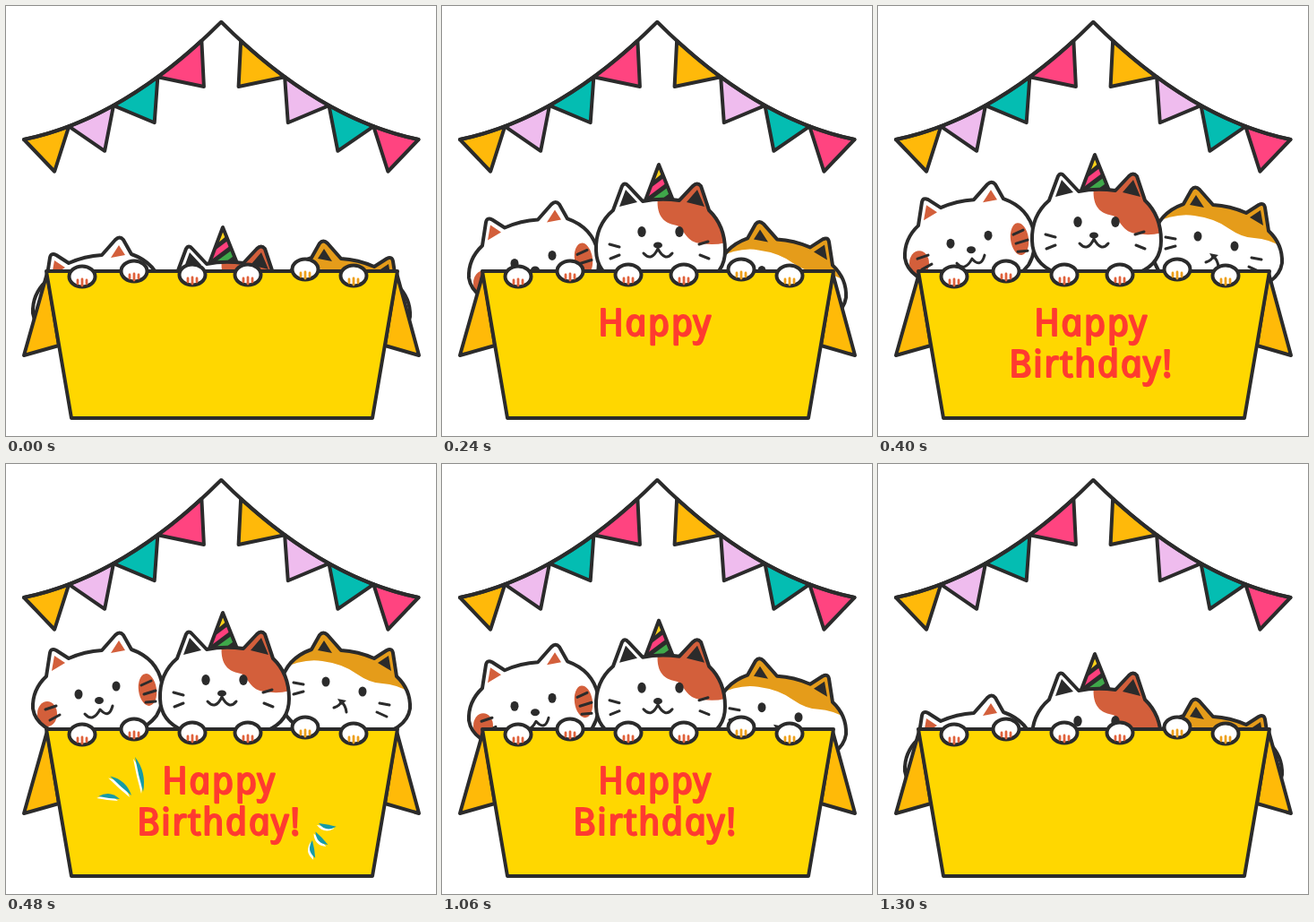
These frames come from a looping animation (480 by 480 pixels, 1380 ms). An HTML page:

```html
<!DOCTYPE html>
<html lang="en">
<head>
<meta charset="utf-8">
<title>Birthday cats</title>
<style>
  html, body { margin: 0; width: 100%; height: 100%; overflow: hidden; background: #fff; }
  svg { display: block; width: 100vw; height: 100vh; }
  .line { stroke: #2b2b2b; stroke-width: 4; stroke-linejoin: round; stroke-linecap: round; }
  .thin { fill: none; stroke: #2b2b2b; stroke-width: 3; stroke-linejoin: round; stroke-linecap: round; }
  .open { fill: none; }
  .white { fill: #fff; }
  .ink { fill: #2b2b2b; }
  .rust { fill: #d35f3b; }
  .amber { fill: #e59c1a; }
  .flap { fill: #ffba08; }
  text {
    font: italic 400 42px "Open Sans", "Noto Sans", sans-serif;
    letter-spacing: 1.7px;
    fill: #ff3b30; stroke: #ff3b30; stroke-width: 2.2; stroke-linejoin: round;
    text-anchor: middle;
  }
</style>
</head>
<body>
<svg viewBox="0 0 480 480">
  <defs>
    <path id="sideHead" d="M45 237Q29 252 30 273Q34 298 75 304C112 308 150 305 168 281Q178 264 174 244Q168 217 140 207L131 191Q127 186 122 191L107 208Q88 209 70 217L56 208Q50 205 49 211Z"/>
    <path id="midHead" d="M191 217Q171 234 172 262C173 300 215 304 245 304C275 304 316 300 316 262Q316 234 298 217L289 190Q285 185 280 190L265 206Q243 203 224 207L208 190Q204 185 201 190Z"/>
    <path id="sideEars" d="M54 214L51 231L66 222ZM126 197L117 211L133 208Z"/>
    <path id="hatShape" d="M242 166L227 206Q243 212 258 206Z"/>
    <clipPath id="sideClip"><use href="#sideHead"/></clipPath>
    <clipPath id="midClip"><use href="#midHead"/></clipPath>
    <clipPath id="hatClip"><use href="#hatShape"/></clipPath>
  </defs>

  <g id="bunting" class="line"></g>

  <g id="left">
    <use href="#sideHead" class="white"/>
    <g clip-path="url(#sideClip)" class="rust">
      <ellipse cx="46" cy="279" rx="11" ry="14"/>
      <ellipse cx="158" cy="252" rx="10" ry="18" transform="rotate(-8 158 252)"/>
    </g>
    <use href="#sideEars" class="rust"/>
    <use href="#sideHead" class="line open"/>
    <g class="ink">
      <ellipse cx="81" cy="257" rx="4.5" ry="5.5"/>
      <ellipse cx="123" cy="248" rx="4.5" ry="5.5"/>
      <ellipse cx="104" cy="264" rx="5" ry="4"/>
    </g>
    <path class="thin" d="M88 279Q97 289 105 274Q115 285 119 270M151 247L162 242M154 257L167 253M156 266L167 265M44 274L56 270M49 286L60 280"/>
  </g>

  <g id="right">
    <g transform="matrix(-1 0 0 1 481 0)">
      <use href="#sideHead" class="white"/>
      <g clip-path="url(#sideClip)">
        <path class="amber" d="M181 232Q150 216 128 220Q105 223 90 234Q74 245 61 245Q43 246 25 258V180H181Z"/>
      </g>
      <use href="#sideEars" class="ink"/>
      <use href="#sideHead" class="line open"/>
    </g>
    <g class="ink">
      <ellipse cx="357" cy="243" rx="4.5" ry="5.5"/>
      <ellipse cx="398" cy="254" rx="4.5" ry="5.5"/>
      <path d="M370 262L380 264L374 269Z"/>
    </g>
    <path class="thin" d="M366 272Q373 270 374 265Q379 269 380 277M321 244L332 246M321 257L332 254M417 267L428 269M414 277L425 282"/>
  </g>

  <g id="middle">
    <use href="#hatShape" class="ink"/>
    <g clip-path="url(#hatClip)">
      <path fill="#ffd21a" d="M230 189L254 169V150H230Z"/>
      <path stroke="#ff3f7d" stroke-width="6" d="M222 204L258 177"/>
      <path stroke="#3fa84a" stroke-width="6.5" d="M224 216L264 187"/>
      <path stroke="#ffd21a" stroke-width="5" d="M240 217L270 195"/>
    </g>
    <use href="#hatShape" class="line open"/>
    <use href="#midHead" class="white"/>
    <path class="rust" clip-path="url(#midClip)" d="M241 200C238 226 250 232 262 234C270 236 272 254 290 254Q305 257 320 252V180H241Z"/>
    <path class="ink" d="M205 194L198 213L218 208ZM285 194L273 208L293 213Z"/>
    <use href="#midHead" class="line open"/>
    <g class="ink">
      <ellipse cx="223" cy="241" rx="4.7" ry="6"/>
      <ellipse cx="265" cy="241" rx="4.7" ry="6"/>
      <ellipse cx="241" cy="256" rx="5" ry="3.6"/>
    </g>
    <path class="thin" d="M225 265Q234 275 241 260Q249 275 257 265M187 255L198 258M188 271L198 267M287 255L297 252M288 267L298 271"/>
  </g>

  <g class="line">
    <path class="flap" d="M46 298L20 390L59 379Z"/>
    <path class="flap" d="M436 298L461 390L423 379Z"/>
    <path fill="#ffd700" d="M45 296H437L409 460H73Z"/>
  </g>
  <g id="paws"></g>

  <g id="words">
    <text id="happy" transform="translate(240.5 368) skewX(12)">Happy</text>
    <text id="birthday" transform="translate(240.5 414) skewX(12)">Birthday!</text>
  </g>
  <g id="sparks"></g>
</svg>

<script>
const $ = id => document.getElementById(id);

// Bunting: equal spans of one hanging curve, mirrored with the colours reversed
const hues = ["#ffb90a", "#efbcee", "#04bdb2", "#ff4480"];
const [start, sag, peak] = [[20, 149], [132, 126], [240, 18]];
// s = t gives a point on the curve, s < t the control point of that span
const hang = (s, t) => start.map((p, i) =>
  (1 - s) * (1 - t) * p + (s + t - 2 * s * t) * sag[i] + s * t * peak[i]);
const flag = (color, i) => {
  const s = i * 0.225, t = s + 0.225, m = (s + t) / 2;
  const [x, y] = hang(m, m);
  return `<path fill="${color}" d="M${hang(s, s)}Q${hang(s, t)} ${hang(t, t)}L${x + 9 + 6 * i} ${y + 42 - 4 * i}Z"/>`;
};
const half = colors => colors.map(flag).join("") +
  `<path class="open" d="M${start}Q${sag} ${peak}"/>`;
$("bunting").innerHTML = half(hues) +
  `<g transform="matrix(-1 0 0 1 480.5 0)">${half([...hues].reverse())}</g>`;

// Paws resting on the edge of the box
const paw = (x, y, color) => `<g transform="translate(${x} ${y})">
  <ellipse class="line white" rx="14.5" ry="11.5"/>
  <path d="M-5 4V8M0 3V10M5 4V8" stroke="${color}" stroke-width="2.8" stroke-linecap="round"/></g>`;
$("paws").innerHTML =
  paw(85, 302, "#e0623c") + paw(143, 296, "#e0623c") +
  paw(208, 300, "#e0623c") + paw(270, 300, "#e0623c") +
  paw(334, 294, "#eda01c") + paw(388, 301, "#eda01c");

// A fan of three curved, tapered strokes with a pale edge
const fan = (x, y, dx, dy, angle, length, grow) => [0, 1, 2].map(i => {
  const a = (angle + 35 * i) * Math.PI / 180, r = length + grow * i;
  const ux = Math.cos(a), uy = Math.sin(a);
  const bend = w => `${ux * r / 2 - uy * w} ${uy * r / 2 + ux * w}`;
  const d = `M0 0Q${bend(9)} ${ux * r} ${uy * r}Q${bend(-1)} 0 0Z`;
  return `<g transform="translate(${x + dx * i} ${y + dy * i})">
    <path class="white" transform="translate(-2 2)" d="${d}"/><path fill="#159aa6" d="${d}"/></g>`;
}).join("");
$("sparks").innerHTML = fan(127, 374, 13, -4, 187, 24, 8) + fan(349, 401, -3.5, 9.5, 11, 20, 0);

// Poses change every STEP ms, with one long hold on the full picture
const STEP = 80, HOLD = 500, FULL = 6, LAST = 11;
const LOOP = LAST * STEP + HOLD;
const cats = {
  left: { low: 70, up: [0, 6], sink: 70, down: 7 },
  middle: { low: 81, up: [0, 3.7], sink: 46, down: 7 },
  right: { low: 74, up: [2, 6], sink: 74, down: 5.5 }
};
const ease = (n, from, to) => Math.min(1, Math.max(0, (n - from) / (to - from))) ** 1.2;
const drop = (n, { low, up, sink, down }) =>
  n <= FULL ? low * ease(-n, -up[1], -up[0]) : sink * ease(n, down, LAST);

function poseAt(t) {
  const held = Math.max(0, Math.min(t - FULL * STEP, HOLD - STEP));
  return Math.floor((t - held) / STEP);
}

const show = (id, on) => $(id).setAttribute("visibility", on ? "visible" : "hidden");

function draw() {
  const n = poseAt(performance.now() % LOOP);
  for (const id in cats) $(id).setAttribute("transform", `translate(0 ${drop(n, cats[id])})`);
  const scale = n === 4 ? 1.18 : 1;
  $("words").setAttribute("transform", `translate(239 389) scale(${scale}) translate(-239 -389)`);
  show("happy", n >= 2 && n < LAST);
  show("birthday", n >= 4 && n < LAST);
  show("sparks", n === FULL);
  requestAnimationFrame(draw);
}
draw();
</script>
</body>
</html>
```
